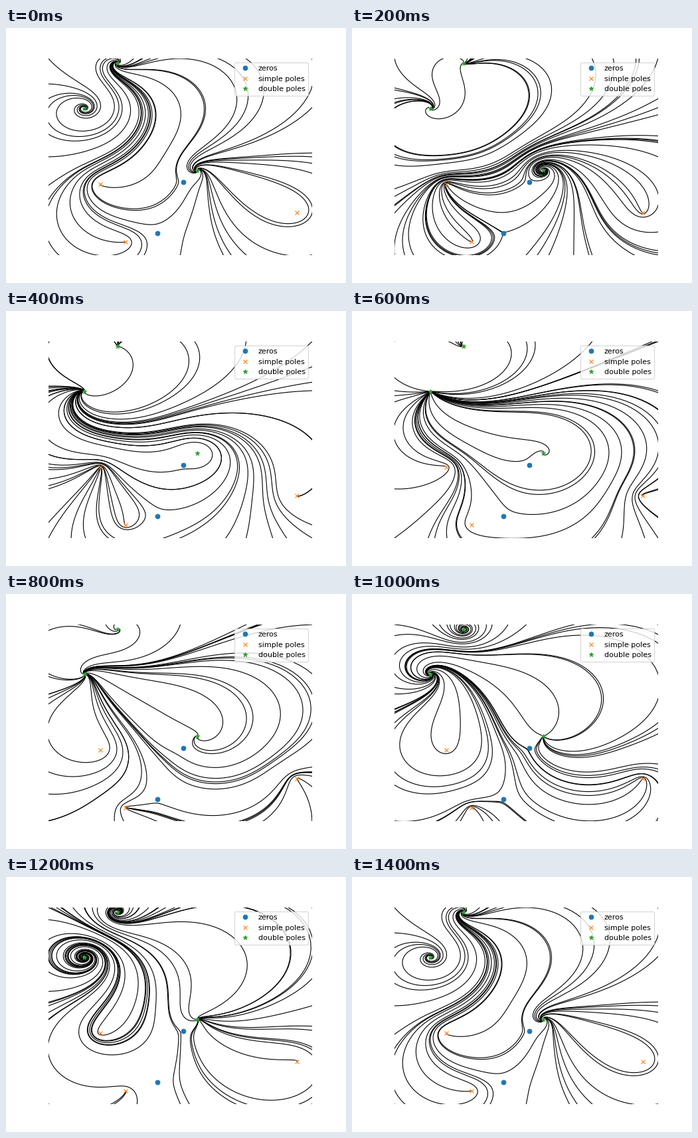
A matplotlib script for the animation above (1600 ms loop, 512 px wide and 384 px high).

```python
import numpy as np
import matplotlib.pyplot as plt
from matplotlib.animation import FuncAnimation

FRAMES = 8
REACH = 6.0        # trajectories are followed this far outside the view
STEP = 0.06        # step length relative to the nearest singular point

fig = plt.figure(figsize=(6.4, 4.8), dpi=80)
ax = fig.add_subplot()
ax.set_axis_off()
ax.set_xlim(0, 1)
ax.set_ylim(0, 1)


def from_pixels(*points):
    """Stage pixels to complex numbers in the unit square of the axes."""
    x, y = np.array(points, float).T
    return (x - 64) / 396.8 + 1j * (341.76 - y) / 295.68


zeros = from_pixels((267, 232), (228, 309))
simple_poles = from_pixels((142, 235), (180, 322), (438, 278))
double_poles = from_pixels((168, 53), (118, 120.8), (288, 214))
poles = np.concatenate([simple_poles, double_poles])
singular = np.concatenate([zeros, poles])
orders = np.array([1] * 2 + [-1] * 3 + [-2] * 3)

side = np.linspace(0, 1, 5)
starts = (side[:, None] + 1j * side).ravel()


def direction(z, phase, previous):
    """Unit tangent of the horizontal foliation, continuing the previous one."""
    angle = phase + (orders * np.angle(z[:, None] - singular)).sum(axis=1)
    v = np.exp(-0.5j * angle)
    return np.where((v * previous.conj()).real < 0, -v, v)


def trajectories(phase, steps=1000):
    """Follow every start both ways with RK4; one row per curve."""
    z = np.concatenate([starts, starts])
    v = direction(starts, phase, np.ones(len(starts), complex))
    v = np.concatenate([v, -v])
    path = [z]
    for _ in range(steps):
        gap = np.abs(z[:, None] - singular)
        alive = (gap[:, 2:5].min(axis=1) > 0.004) \
            & (gap[:, 5:].min(axis=1) > 0.008) & (np.abs(z - 0.5) < REACH)
        if not alive.any():
            break
        h = STEP * gap.min(axis=1) * alive
        k1 = direction(z, phase, v)
        k2 = direction(z + h / 2 * k1, phase, k1)
        k3 = direction(z + h / 2 * k2, phase, k2)
        k4 = direction(z + h * k3, phase, k3)
        z = z + h * (k1 + 2 * k2 + 2 * k3 + k4) / 6
        v = k4
        path.append(z)
    path = np.array(path).T
    n = len(starts)
    return np.hstack([path[n:, ::-1], path[:n]])


for points, marker, label in ((zeros, "o", "zeros"),
                              (simple_poles, "x", "simple poles"),
                              (double_poles, "*", "double poles")):
    ax.plot(points.real, points.imag, marker, label=label)
ax.legend(loc="upper right")
curves = [ax.plot([], [], color="black", lw=1, zorder=1)[0] for _ in starts]


def update(frame):
    phase = 2 * np.pi * frame / (FRAMES - 1)
    for curve, z in zip(curves, trajectories(phase)):
        curve.set_data(z.real, z.imag)
    return curves


anim = FuncAnimation(fig, update, frames=FRAMES, interval=200, repeat=True)
plt.show()
```
